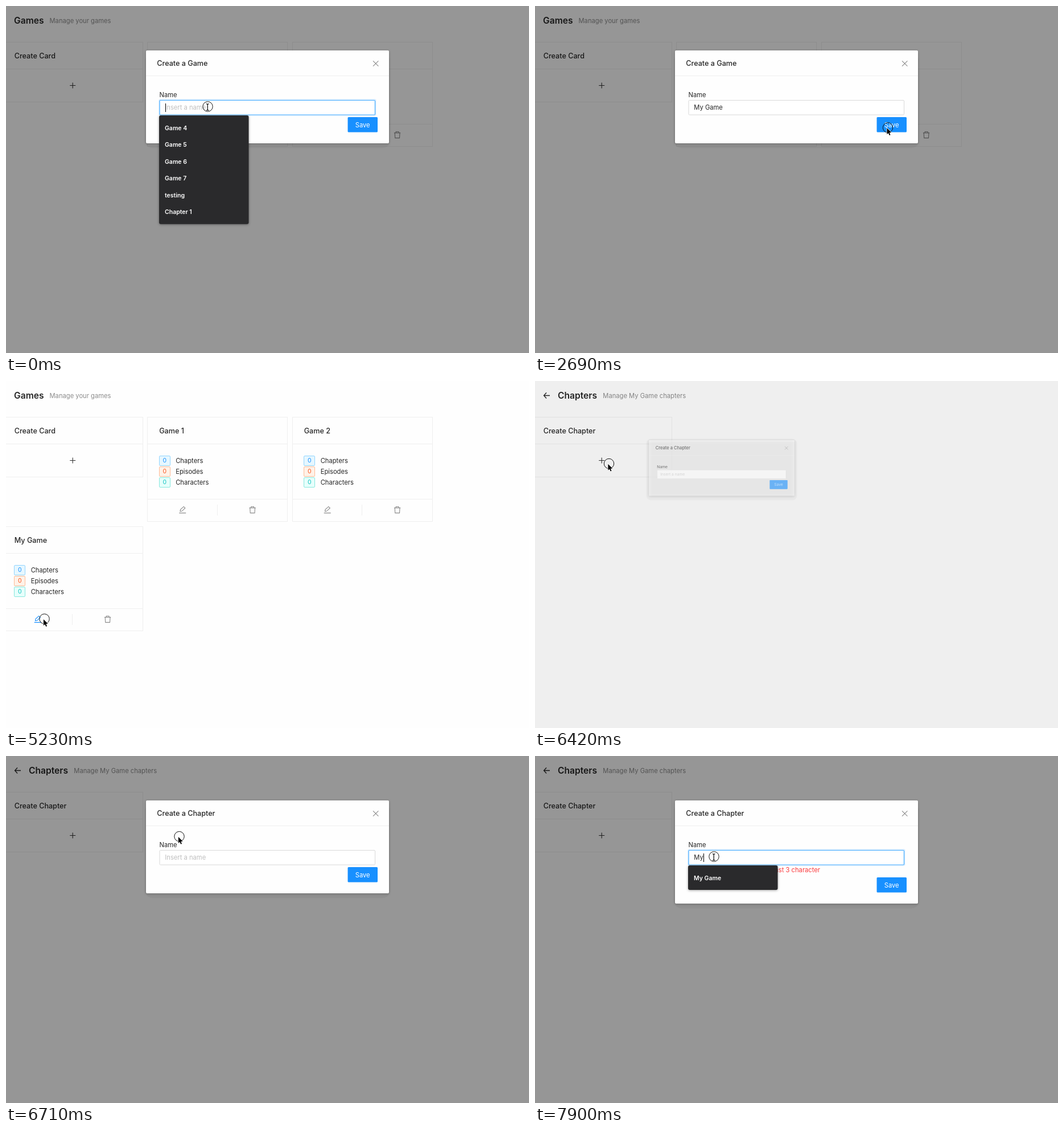
An HTML page with a canvas that plays this animation: 919x609 px, repeating every 8 s.

```html
<!DOCTYPE html>
<html lang="en">
<head>
<meta charset="utf-8">
<title>Games</title>
<style>
  html, body { margin: 0; width: 100%; height: 100%; overflow: hidden; background: #fefefe; }
  canvas { display: block; width: 919px; height: 609px; }
</style>
</head>
<body>
<canvas id="stage" width="919" height="609"></canvas>
<script>
const W = 919, H = 609, LOOP = 8000, STEP = 149;
const ctx = document.getElementById('stage').getContext('2d');
const INK = '#262626', MUTED = '#8c8c8c', LINE = '#efefef', BLUE = '#1890ff';
const MASK = 0.41, BODY = 11.2, HEAD = 12.6;

const EDIT = new Path2D('M-6 5.6h12M-4.2 2.8l.6-3.2L2-5.6 4.6-3-1 2.3z');
const TRASH = new Path2D('M-5.6-3.4H5.6M-2.4-3.4v-2.1h4.8v2.1M-4.4-3.4l.5 9h7.8l.5-9');
const PLUS = new Path2D('M-5 0H5M0-5V5');
const CLOSE = new Path2D('M-4.7-4.7l9.4 9.4M4.7-4.7l-9.4 9.4');
const BACK = new Path2D('M-5 0H5.5M-.4-5L-5 0l4.6 5');
const BEAM = new Path2D('M-2.5-5l2.2 1 2.2-1M-.3-4V6M-2.5 7l2.2-1 2.2 1');
const ARROW = new Path2D('M0 0v11l2.5-2.3 1.8 4 1.8-.8-1.7-3.9 3.4-.2z');

const HINTS = ['Game 4', 'Game 5', 'Game 6', 'Game 7', 'testing', 'Chapter 1'];
const TAGS = [
  ['Chapters', '#1890ff', '#e6f7ff', '#91d5ff'],
  ['Episodes', '#fa541c', '#fff2e8', '#ffbb96'],
  ['Characters', '#13c2c2', '#e6fffb', '#87e8de']
];

// pointer moves: first step, last step, where it ends up
const HOME = [354.5, 176.5];
const MOVES = [
  [12, 18, 620, 213.5],
  [26, 33, 67.5, 417.5],
  [37, 42, 130, 145],
  [43, 45.3, 313, 141],
  [45.3, 47, 314.5, 176.5]
];

const clamp = (v, lo = 0, hi = 1) => Math.min(hi, Math.max(lo, v));
const smooth = u => u * u * (3 - 2 * u);

function text(s, x, cy, size, color, weight = 400, align = 'left') {
  ctx.font = `${weight} ${size}px Inter, "Liberation Sans", sans-serif`;
  ctx.textAlign = align;
  ctx.fillStyle = color;
  ctx.fillText(s, x, cy + size * 0.364);
}

function rect(x, y, w, h, color) {
  ctx.fillStyle = color;
  ctx.fillRect(x, y, w, h);
}

function round(x, y, w, h, r, fill, stroke, lw = 1) {
  ctx.beginPath();
  ctx.roundRect(x, y, w, h, r);
  if (fill) { ctx.fillStyle = fill; ctx.fill(); }
  if (stroke) { ctx.strokeStyle = stroke; ctx.lineWidth = lw; ctx.stroke(); }
}

function icon(path, x, y, color, lw = 1.1, fill) {
  ctx.save();
  ctx.translate(x, y);
  ctx.strokeStyle = color;
  ctx.lineWidth = lw;
  ctx.stroke(path);
  if (fill) { ctx.fillStyle = fill; ctx.fill(path); }
  ctx.restore();
}

function shadow(alpha) {
  ctx.shadowColor = `rgba(0,0,0,${alpha})`;
  ctx.shadowBlur = 4;
  ctx.shadowOffsetY = 1;
}

// left and top edge of a cell in the card grid
const colX = i => -5.7 + 254.5 * i;
const rowY = i => 63 + 192 * i;

function card(x, y, h, title) {
  const left = Math.floor(x);
  ctx.strokeStyle = LINE;
  ctx.lineWidth = 1;
  ctx.strokeRect(left + 0.5, y + 0.5, 246, h);
  rect(left, y + 47, 246, 1, LINE);
  text(title, x + 20.4, y + 24, HEAD, INK, 500);
}

function createCard(title) {
  card(colX(0), rowY(0), 105, title);
  icon(PLUS, 117.2, 139.5, '#333');
}

function gameCard(col, row, title, editing) {
  const x = colX(col), y = rowY(row), left = Math.floor(x + 20.4);
  card(x, y, 183, title);
  TAGS.forEach(([label, color, bg, border], i) => {
    const cy = y + 76.7 + i * 19;
    round(left + 0.5, y + 68.5 + i * 19, 19, 17, 1.6, bg, border);
    text('0', x + 30, cy, 10.4, color, 400, 'center');
    text(label, x + 49.4, cy, BODY, INK);
  });
  rect(Math.floor(x), y + 144, 246, 1, LINE);
  rect(Math.floor(x + 122.5), y + 154, 1, 19, LINE);
  icon(EDIT, x + 61.4, y + 163, editing ? BLUE : MUTED);
  icon(TRASH, x + 184.3, y + 163, MUTED);
}

function header(x, title, note, noteX) {
  text(title, x, 25.5, 15.6, INK, 600);
  text(note, noteX, 25.5, BODY, MUTED);
}

function gamesPage(n) {
  header(14, 'Games', 'Manage your games', 76.5);
  createCard('Create Card');
  gameCard(1, 0, 'Game 1');
  gameCard(2, 0, 'Game 2');
  if (n > 20) gameCard(0, 1, 'My Game', n >= 33);
}

function chaptersPage() {
  icon(BACK, 20.5, 25.5, INK, 1.3);
  header(40, 'Chapters', 'Manage My Game chapters', 119.3);
  createCard('Create Chapter');
}

function hintList(list) {
  const pitch = 29.55;
  ctx.save();
  shadow(0.35);
  round(269, 192, 157.5, 43 + pitch * (list.length - 1), 3, '#2a2a2c');
  ctx.restore();
  list.forEach((s, i) => text(s, 279, 213.8 + i * pitch, 10.5, '#fff', 600));
}

function input(value, focus, caret) {
  if (focus) round(269, 164, 381, 28, 2.5, null, 'rgba(24,144,255,.16)', 1.4);
  round(270, 165.5, 378.5, 25.5, 1.5, '#fff', focus ? '#40a9ff' : '#d9d9d9', focus ? 1.2 : 1);
  text(value || 'Insert a name', 279.3, 178, BODY, value ? INK : '#bfbfbf');
  const end = value ? ctx.measureText(value).width : 0;
  if (caret) rect(Math.round(279.8 + end), 171, 1, 15, '#000');
}

// "open" runs from 0 (hidden) to 1 (fully zoomed in)
function modal({ title, open, value, focus, caret, error, hints }) {
  const drop = error ? 18 : 0, halo = open < 1 ? 8 : 2;
  const zoom = 1 - (1 - open) ** 2.25;
  rect(0, 0, W, H, `rgba(0,0,0,${MASK * open ** 1.75})`);
  ctx.save();
  ctx.translate(132, 142.5);
  ctx.scale(zoom, zoom);
  ctx.translate(-132, -142.5);
  ctx.globalAlpha = zoom;
  round(246 - halo, 86 - halo * 1.5, 427 + 2 * halo, 162 + drop + halo * 2.3, 14, 'rgba(0,0,0,.045)');
  shadow(0.25);
  round(246, 78, 427, 163 + drop, 2, '#fefefe');
  ctx.shadowColor = 'transparent';
  rect(246, 122, 427, 1, LINE);
  text(title, 265.3, 100.5, HEAD, INK, 500);
  icon(CLOSE, 649.7, 101, MUTED);
  text('Name', 269.6, 156, BODY, INK);
  input(value, focus, caret);
  ctx.globalAlpha = zoom * error;
  text('the name must contains at least 3 character', 269.6, 200.3, BODY, '#fb3a3d');
  ctx.globalAlpha = zoom;
  round(600.5, 195 + drop, 52.5, 26.5, 1.6, BLUE);
  text('Save', 626.7, 208.5 + drop, BODY, '#fff', 400, 'center');
  if (hints) hintList(hints);
  ctx.restore();
}

function gameModal(n) {
  // two bursts of typing
  const typed = clamp(n - 3, 0, 3) + clamp(Math.floor(1.5 * (n - 7)), 0, 4);
  modal({
    title: 'Create a Game',
    open: clamp((21 - n) / 1.5),
    value: 'My Game'.slice(0, typed),
    focus: n < 17,
    caret: n < 2 || (typed > 0 && n < 13),
    error: clamp((n - 4) / 2) * clamp((10 - n) / 2),
    hints: typed ? null : HINTS
  });
}

function chapterModal(n) {
  const typed = clamp(Math.ceil((n - 50) / 2), 0, 2);
  modal({
    title: 'Create a Chapter',
    open: clamp((n - 42) / 3),
    value: 'My'.slice(0, typed),
    focus: n >= 47,
    caret: n >= 48,
    error: clamp((n - 51) / 2),
    hints: typed ? ['My Game'] : n >= 49 ? HINTS : null
  });
}

function pointerAt(n) {
  let [x, y] = HOME;
  for (const [start, end, toX, toY] of MOVES) {
    const e = smooth(clamp((n - start) / (end - start)));
    x += (toX - x) * e;
    y += (toY - y) * e;
  }
  return [x, y];
}

function pointer(n, hasInput) {
  const [x, y] = pointerAt(n);
  ctx.beginPath();
  ctx.arc(x, y, 8.7, 0, Math.PI * 2);
  ctx.strokeStyle = '#111';
  ctx.lineWidth = 1;
  ctx.stroke();
  if (hasInput && x > 270 && x < 649 && y > 165 && y < 191) {
    icon(BEAM, x, y, '#fff', 2.4);
    icon(BEAM, x, y, '#000', 1.2);
  } else {
    icon(ARROW, x - 1.6, y + 0.8, '#fff', 1.4, '#000');
  }
}

function draw(n) {
  const making = n < 21, adding = n > 42;
  rect(0, 0, W, H, '#fefefe');
  if (n < 37) gamesPage(n);
  else chaptersPage();
  if (making) gameModal(n);
  if (adding) chapterModal(n);
  pointer(n, making || adding);
}

function tick() {
  // the screen refreshes in fixed steps
  draw(Math.floor(performance.now() % LOOP / STEP));
  requestAnimationFrame(tick);
}
tick();
</script>
</body>
</html>
```
